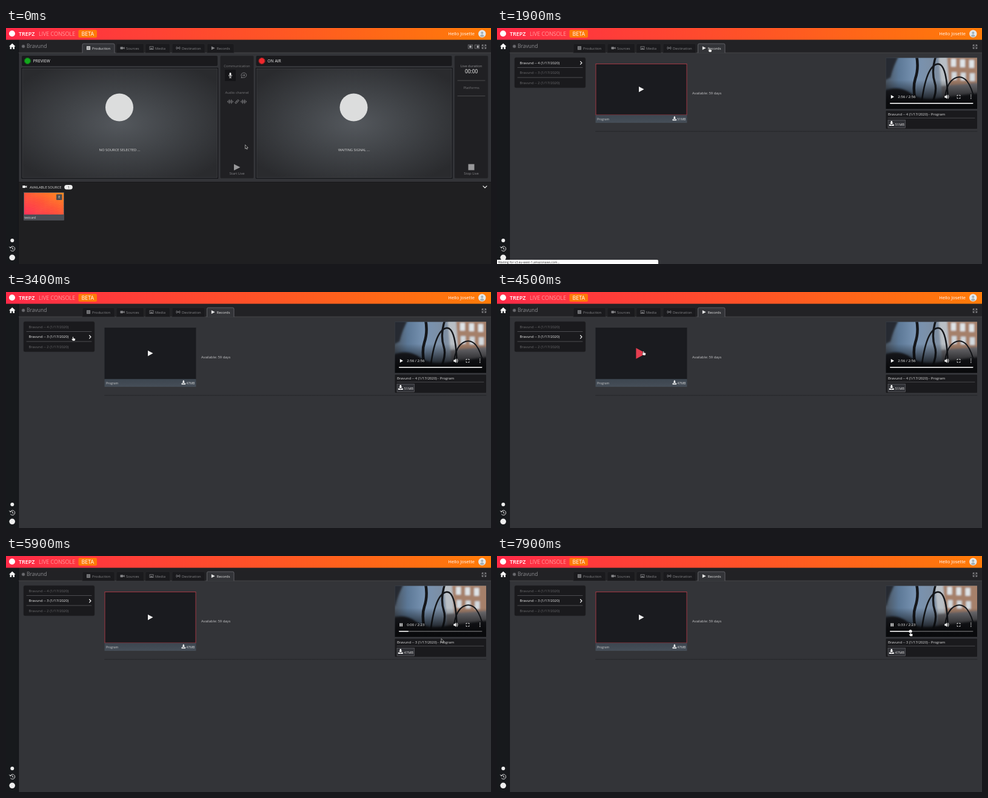
Write an HTML page that moves like this. It is 800 px wide and 391 px high and loops after 8 s.

```html
<!DOCTYPE html>
<html lang="en">
<head>
<meta charset="utf-8">
<title>Live console</title>
<style>
  html, body { margin: 0; width: 100%; height: 100%; overflow: hidden; background: #333438; }
  svg { display: block; width: 100%; height: 100%; }
  text { font-family: "Open Sans", "Noto Sans", sans-serif; white-space: pre; }
  .mid { text-anchor: middle; }
  .end { text-anchor: end; }
  .line { fill: none; stroke-linecap: round; stroke-linejoin: round; }
</style>
</head>
<body>
<svg id="stage" viewBox="0 0 800 391" preserveAspectRatio="none"></svg>
<script>
const LOOP = 8000, STEP = 100;
const OPEN = 1300, STATUS_END = 2300, PICK = 3100, LOAD = 4900, PLAY = 5300, SEEK = 6900;
const PROJECT = 'Bravund';

const rect = (x, y, w, h, fill, more = '') =>
  `<rect x="${x}" y="${y}" width="${w}" height="${h}" fill="${fill}" ${more}/>`;
const dot = (x, y, r, fill, more = '') => `<circle cx="${x}" cy="${y}" r="${r}" fill="${fill}" ${more}/>`;
const shape = (d, fill, more = '') => `<path d="${d}" fill="${fill}" ${more}/>`;
const line = (d, color, w = 0.7, more = '') =>
  `<path class="line" d="${d}" stroke="${color}" stroke-width="${w}" ${more}/>`;
const text = (x, y, s, size = 5.85, fill = '#ccc', more = '') =>
  `<text x="${x}" y="${y}" font-size="${size}" fill="${fill}" ${more}>${s}</text>`;
const group = (id, body, more = '') => `<g id="${id}" ${more}>${body}</g>`;
const at = (x, y, body) => `<g transform="translate(${x} ${y})">${body}</g>`;

const icon = {
  film: c => rect(-3, -3, 6, 6, c) + line('M-1.2 -2V2M1.2 -2V2M-1.2 0H1.2', '#333438', 0.5),
  camera: c => rect(-3.5, -2, 4.6, 4, c, 'rx=".6"') + shape('M1.3 -.5L3.5 -2V2L1.3 .5Z', c),
  image: c => rect(-3, -2.4, 6, 4.8, 'none', `stroke="${c}" stroke-width=".8"`) +
    shape('M-2.2 1.6L-.6 -.6 .5 .6 1.2 0 2.3 1.6Z', c),
  antenna: c => dot(0, 0, 0.9, c) +
    line('M-1.5 -1.5Q-2.3 0 -1.5 1.5M1.5 -1.5Q2.3 0 1.5 1.5M-2.7 -2.2Q-4 0 -2.7 2.2M2.7 -2.2Q4 0 2.7 2.2', c),
  play: c => shape('M-2.7 -3L3.2 0 -2.7 3Z', c),
  expand: c => line('M-3.2 -1V-3H-1.2M1.2 -3H3.2V-1M3.2 1V3H1.2M-1.2 3H-3.2V1M-3 -2.8L-1 -.9M3 -2.8L1 -.9M3 2.8L1 .9M-3 2.8L-1 .9', c, 0.8),
  download: c => shape('M-1 -3.4H1V-.9H2.4L0 1.5 -2.4 -.9H-1Z', c) + shape('M-3.3 1.4H-1.3L0 2.5 1.3 1.4H3.3V3.4H-3.3Z', c),
  wave: c => line('M-4.5 -.5V.5M-3 -2V2M-1.5 -3.2V3.2M0 -1.5V1.5M1.5 -3.2V3.2M3 -2V2M4.5 -.5V.5', c, 0.9)
};

function defs() {
  const stops = list => list.map(([o, c, a = 1]) => `<stop offset="${o}" stop-color="${c}" stop-opacity="${a}"/>`).join('');
  return `<defs>
    <linearGradient id="head">${stops([[0, '#ff2a48'], [0.5, '#ff5128'], [1, '#ff7c08']])}</linearGradient>
    <radialGradient id="glow" r=".62">${stops([[0, '#54585d'], [0.45, '#414448'], [1, '#2a2b2e']])}</radialGradient>
    <linearGradient id="card" x1="0" y1="1" x2="1" y2="0">${stops([[0, '#ff2b5a'], [0.5, '#ff5038'], [1, '#ff8a1c']])}</linearGradient>
    <linearGradient id="foot" x1="0" y1="0" x2="0" y2="1">${stops([[0, '#3d4650'], [1, '#464e58']])}</linearGradient>
    <linearGradient id="sky">${stops([[0, '#4b5561'], [0.14, '#5c7896'], [0.32, '#7893b2'], [0.55, '#7d8ea2'], [0.72, '#98a0a8'], [1, '#8f8983']])}</linearGradient>
    <linearGradient id="shade" x1="0" y1="0" x2="0" y2="1">${stops([[0, '#08090b', 0], [0.45, '#08090b', 0.55], [0.75, '#08090b', 0.9], [1, '#08090b', 0.96]])}</linearGradient>
    <filter id="soft" x="-10%" y="-10%" width="120%" height="120%"><feGaussianBlur stdDeviation="1.4"/></filter>
    <filter id="mild" x="-10%" y="-10%" width="120%" height="120%"><feGaussianBlur stdDeviation=".5"/></filter>
    <clipPath id="frame"><rect x="641.5" y="49.5" width="150.5" height="84.5"/></clipPath>
    <clipPath id="thumb"><rect x="30" y="273" width="65" height="36"/></clipPath>
  </defs>`;
}

function chrome() {
  return rect(0, 0, 800, 391, '#333438') +
    rect(21, 19, 779, 22, '#222225') + rect(0, 19, 21, 372, '#17191c') +
    rect(20.5, 19, 0.7, 372, '#101114') +
    rect(0, 0, 800, 19.5, 'url(#head)') +
    dot(10, 9.2, 5, '#fff') +
    text(21, 12.6, 'TREPZ', 9, '#fff', 'font-weight="600"') +
    text(54, 12.6, 'LIVE CONSOLE', 9.1, '#ffd9d2', 'font-weight="300"') +
    rect(119.5, 3, 30.5, 13, '#ff7a08', 'rx="2.5"') +
    text(134.8, 12.6, 'BETA', 8.9, '#fff', 'class="mid"') +
    text(773, 12, 'Hello Josette', 7.5, '#fff', 'class="end"') +
    dot(785.3, 9.5, 6.2, '#e4e8ea') + dot(785.3, 8, 2, '#a3b0b6') +
    shape('M781.6 13.2Q785.3 8 789 13.2 785.3 16.2 781.6 13.2Z', '#a3b0b6') +
    shape('M5 30.5L10.3 25.5 15.6 30.5H14V35H11.4V31.8H9.2V35H6.6V30.5Z', '#f4f4f4') +
    dot(10.3, 352, 3, '#eee') +
    line('M7 364.2A4 4 0 1 1 7.4 368M5.6 362.6L7 364.6 9 363.4M10.6 364V366.2H12.3', '#eee', 0.9) +
    dot(10.2, 380.3, 4.8, '#eee') +
    dot(28.6, 30.4, 2.4, '#6c6c70', 'stroke="#5c5c60" stroke-width="1.2" stroke-dasharray="1 .7"') +
    text(34, 33.4, PROJECT, 8.5, '#8d8d91') +
    at(788.5, 31, icon.expand('#a8a8ab'));
}

function tabs(active) {
  const list = [
    ['Production', 126, 53, 'film'], ['Sources', 182, 45.5, 'camera'], ['Media', 230, 40.5, 'image'],
    ['Destination', 274, 54, 'antenna'], ['Records', 331.5, 44.5, 'play']
  ];
  return line('M21 41H800', '#55565a', 0.6) + list.map(([name, x, w, pic]) => {
    const on = name === active, c = on ? '#e6e6e6' : '#858588';
    const d = `M${x} 41.3V28Q${x} 26 ${x + 2} 26H${x + w - 2}Q${x + w} 26 ${x + w} 28V41.3`;
    return shape(d, on ? '#333438' : '#1a1a1d', `stroke="${on ? '#77787c' : '#2a2a2d'}" stroke-width=".7"`) +
      at(x + 10, 33.2, icon[pic](c)) + text(x + 16, 35.7, name, 5.9, c);
  }).join('');
}

function screen(x, label, color, id, title) {
  const cx = x + 161.5;
  return rect(x, 46, 323, 17, '#1a1a1d', 'rx="2"') +
    group(id, dot(x + 9.5, 54.6, 4.6, color) +
      dot(x + 9.5, 54.6, 5.1, 'none', `stroke="${color}" stroke-width="1" stroke-dasharray="1 .6"`)) +
    text(x + 18.8, 57, title, 6.75, '#eee') +
    rect(x, 66.5, 323.5, 182.5, 'url(#glow)', 'stroke="#101114" stroke-width="1.2"') +
    rect(x + 1.1, 67.6, 321.3, 180.3, 'none', 'stroke="#4a4b4f" stroke-width=".5"') +
    dot(cx - 0.5, 131.5, 23, '#dcdddd') +
    text(cx, 203.5, label, 5.85, '#ddd', 'class="mid"');
}

function production() {
  const grey = '#77777a';
  const note = (x, y, s, c = grey) => text(x, y, s, 5.85, c, 'class="mid"');
  const side = x => rect(x, 46, 55, 203, '#202023', 'rx="2" stroke="#29292c" stroke-width=".6"');
  return tabs('Production') +
    at(766, 31, rect(-3.7, -3, 7.4, 6, 'none', 'stroke="#88888b" stroke-width=".7"') + rect(-1.8, -1.7, 3.6, 3.4, '#b0b0b3')) +
    at(777, 31, rect(-3.7, -3, 7.4, 6, 'none', 'stroke="#88888b" stroke-width=".7"') + rect(-0.4, -1.8, 3, 3.6, '#b0b0b3')) +
    screen(26, 'NO SOURCE SELECTED ...', '#12a81c', 'ready', 'PREVIEW') +
    screen(412.5, 'WAITING SIGNAL ...', '#f0282d', 'air', 'ON AIR') +
    side(353.5) + side(740) +
    note(381, 65, 'Communication') +
    rect(361, 69, 18, 19, '#151518', 'rx="1"') +
    rect(368.6, 74, 2.8, 5.4, '#f0f0f0', 'rx="1.4"') +
    line('M367.3 78.2Q367.5 80.8 370 80.8 372.5 80.8 372.7 78.2M370 81V82.6M368.4 82.6H371.6', '#f0f0f0', 0.7) +
    line('M388.2 82.2L389 80.8A4.4 4 0 1 1 391.5 82.1ZM390 78.2H393.8M392.5 76.8L394 78.2 392.5 79.6', '#8a8a8d', 0.8) +
    note(381, 108.5, 'Audio channel') +
    at(370, 122, icon.wave(grey)) + at(392, 122, icon.wave(grey)) +
    at(381, 122, `<g transform="rotate(-45)">` +
      line('M-.4 -1.3H-2.4A1.3 1.3 0 0 0 -2.4 1.3H-.6M.4 -1.3H2.4A1.3 1.3 0 0 1 2.4 1.3H.6M-1.3 0H1.3', '#8a8a8d', 0.9) + '</g>') +
    shape('M376 225.5L386.4 230.8 376 236Z', '#98989a') + note(381, 243, 'Start Live', '#858588') +
    note(767.6, 65, 'Live duration', '#929295') +
    text(767.6, 75, '00:00', 8.3, '#fff', 'class="mid"') +
    line('M745 87H790M745 112.6H790', '#68686b', 0.6) +
    note(767.6, 100.7, 'Platforms') +
    rect(762.5, 225.5, 10, 10, '#98989a') + note(767.6, 243, 'Stop Live', '#858588') +
    rect(21, 255, 779, 136, '#1f1f21') + line('M21 255.3H800', '#161619', 0.8) +
    at(30.8, 263, icon.camera('#eee')) + text(39, 266, 'AVAILABLE SOURCE', 5.8, '#ddd') +
    rect(96.2, 260, 13.6, 7.6, '#ededed', 'rx="3.8"') + text(103, 266, '1', 5.6, '#222', 'class="mid"') +
    line('M787 261.8L790 264.8 793 261.8', '#fff', 1.2) +
    rect(29.3, 272.4, 66.4, 46, '#4a4e56', 'stroke="#5a5d63" stroke-width=".5"') +
    rect(30, 273, 65, 36, 'url(#card)') +
    '<path id="dots" fill="none" stroke="#ffb04a" stroke-width=".8" stroke-linecap="round" opacity=".55" clip-path="url(#thumb)"/>' +
    rect(83, 275.5, 9.5, 9.5, '#4d4d50', 'rx="1"') + text(87.8, 282.4, 'E', 5.6, '#e8e8e8', 'class="mid"') +
    text(30.3, 315.7, 'testcard', 5, '#ddd');
}

function photo() {
  const cable = (d, w) => line(d, '#15171b', w);
  const windows = [749, 764, 779].map((x, i) =>
    rect(x, 51 + i, 8, 13, '#dfe4e8') + rect(x + 1, 73 + i, 8, 13, '#d3d9de')).join('');
  return '<g clip-path="url(#frame)">' + rect(641, 49, 152, 86, 'url(#sky)') +
    group('scene',
      shape('M742 44H806V92L746 96Z', '#a5806a') + windows +
      shape('M728 44H742L746 97H733Z', '#b9bfc5') +
      shape('M733 96L806 90V140H736Z', '#77767a') +
      shape('M630 44H664Q654 62 649 82L630 92Z', '#272b32') +
      shape('M630 108Q660 92 682 108T740 114L806 106V140H630Z', '#1c1e22'), 'filter="url(#soft)"') +
    '<g filter="url(#mild)">' +
    cable('M692 46Q696 66 690 84T694 136', 4.5) +
    cable('M699 136Q706 66 725 60T744 136', 2.6) +
    cable('M724 46Q716 72 722 90T712 136', 3.4) +
    cable('M737 136Q738 88 758 82T788 120', 2) + '</g>' +
    rect(641, 86, 152, 49, 'url(#shade)') + '</g>';
}

function player() {
  return photo() +
    group('paused', shape('M649.8 111L655 114 649.8 117Z', '#fff')) +
    group('playing', rect(649.5, 111.3, 1.6, 5.4, '#fff') + rect(652.3, 111.3, 1.6, 5.4, '#fff')) +
    '<text id="clock" x="661.3" y="116.1" font-size="6" fill="#fff"></text>' +
    shape('M738.3 112.6H740L742.4 110.6V117.4L740 115.4H738.3Z', '#fff') +
    line('M743.5 112.4Q744.6 114 743.5 115.6M744.3 110.9Q746.5 114 744.3 117.1', '#fff', 0.7) +
    line('M759 112.7V111.4H760.4M762.6 111.4H764V112.7M764 115.3V116.6H762.6M760.4 116.6H759V115.3', '#fff', 0.8) +
    [111.3, 114, 116.7].map(y => dot(781.8, y, 0.75, '#fff')).join('') +
    rect(648, 124, 137.5, 1.6, '#fff', 'opacity=".35" rx=".8"') +
    '<rect id="bar" x="648" y="124" height="1.6" rx=".8" fill="#fff"/>' +
    dot(682, 124.8, 2.6, '#fff', 'id="knob"');
}

function records() {
  return tabs('Records') +
    rect(29, 49, 117, 50, '#1a1a1d', 'rx="2.5" stroke="#222225" stroke-width=".5"') +
    line('M34 65.5H141M34 82H141', '#707073', 0.6) +
    [4, 3, 2].map((n, i) => text(37.5, 59.8 + i * 16.6, `${PROJECT} -- ${n} (1/17/2020)`, 5.85, '#6b6b6e', `id="row${n}"`)).join('') +
    group('mark', line('M137.6 55.4L140 57.8 137.6 60.2', '#fff', 1.2)) +
    rect(163, 59.5, 150, 84.5, '#1a1b1f', 'id="cardbox" stroke-width=".9"') +
    rect(162.6, 144.3, 150.8, 12.8, 'url(#foot)') +
    text(165, 152.7, 'Program', 5, '#ccc') +
    at(292.8, 149.8, icon.download('#fff')) + text(297.3, 152.9, '', 5.2, '#ddd', 'id="size"') +
    shape('M234 97L242.5 101.6 234 106.2Z', '#f0f0f0', 'id="start"') +
    shape('M229.4 92.8L245.8 101.8 229.4 110.8Z', '#e63e50', 'id="hot"') +
    text(322, 110.3, 'Available: 59 days', 5.85, '#c8c8ca') +
    line('M163 171.2H792', '#1f2023', 0.8, 'stroke-dasharray="1.2 1.2"') +
    player() +
    rect(641.5, 137, 150.5, 30, '#1a1a1d', 'rx="1"') +
    text(645, 145.2, '', 5.85, '#e2e2e2', 'id="title"') +
    line('M645 149.2H788', '#6a6a6d', 0.6) +
    rect(645, 152.4, 28.5, 13, '#303136', 'stroke="#6c6d71" stroke-width=".6"') +
    at(650.8, 158, `<g transform="scale(1.2)">${icon.download('#fff')}</g>`) +
    text(656.5, 162, '', 5.8, '#ddd', 'id="size2"') +
    group('status', shape('M0 384H264Q266 384 266 386V391H0Z', '#fdfdfd') +
      text(2, 389.8, 'Waiting for s3.eu-west-1.amazonaws.com...', 5.05, '#333'));
}

const pointer =
  shape('M0 0V6.6L1.6 5.2 2.6 7.5 3.7 7 2.7 4.9H4.8Z', '#111', 'id="arrow" stroke="#e8e8e8" stroke-width=".6"') +
  shape('M-.8 .6Q0 -.5 .8 .6V2.6L3 3.1Q4 3.4 3.8 4.4L3.2 7H-.4L-2.4 4.2Q-2.4 3.3 -1.4 3.5L-.8 4Z', '#fff',
    'id="hand" stroke="#111" stroke-width=".5"');

const stage = document.getElementById('stage');
stage.innerHTML = defs() + chrome() + group('live', production()) + group('archive', records()) + group('cursor', pointer);

const el = {};
stage.querySelectorAll('[id]').forEach(n => { el[n.id] = n; });
const show = (id, on) => { el[id].style.display = on ? '' : 'none'; };
const set = (id, attrs) => { for (const k in attrs) el[id].setAttribute(k, attrs[k]); };
const within = (t, spans) => spans.some(([a, b]) => t >= a && t < b);

// time, x, y of the pointer tip
const path = [
  [0, 394.5, 193.5], [200, 394, 191], [900, 355, 36.5], [1200, 350.5, 33], [2000, 350.5, 33],
  [2800, 116, 76], [3100, 110.5, 74], [3600, 110.5, 74], [4300, 241.5, 98], [5000, 242, 98],
  [5700, 712, 134], [5900, 718, 136.8], [6200, 716, 136], [6700, 679, 125.5], [7100, 681.5, 126], [8000, 682, 126]
];
const hands = [[1000, 2100], [2700, 3700], [4100, 5100], [6600, LOOP]];

function place(t) {
  const i = path.findIndex(p => p[0] > t);
  const [t0, x0, y0] = path[i - 1], [t1, x1, y1] = path[i];
  const u = (t - t0) / (t1 - t0), e = u * u * (3 - 2 * u);
  return [x0 + (x1 - x0) * e, y0 + (y1 - y0) * e];
}

function ripple(t) {
  let d = '';
  for (let r = 0; r < 18; r++)
    for (let c = 0; c < 30; c++) {
      const x = 30 + c * 2.3 + (r % 2), y = 273 + r * 2.2;
      const lift = 1.6 * Math.sin(c * 0.35 + r * 0.4 - t / 260);
      d += `M${x.toFixed(1)} ${(y + lift).toFixed(1)}h.01`;
    }
  return d;
}

function draw(t) {
  const open = t >= OPEN, picked = t >= PICK, loaded = t >= LOAD, sought = t >= SEEK;
  show('live', !open);
  show('archive', open);
  if (!open) {
    const beat = 0.8 + 0.2 * Math.cos(t / 1800 * 2 * Math.PI);
    set('air', { opacity: beat });
    set('ready', { opacity: 0.5 + beat / 2 });
    set('dots', { d: ripple(t) });
  }
  show('status', t < STATUS_END);

  set('row4', { fill: picked ? '#6b6b6e' : '#f0f0f0' });
  set('row3', { fill: picked ? '#f0f0f0' : '#6b6b6e' });
  set('mark', { transform: `translate(0 ${picked ? 16.6 : 0})` });
  set('cardbox', { stroke: picked && !loaded ? '#1a1b1f' : '#b03a46' });
  el.size.textContent = picked ? '47MB' : '51MB';
  const hot = within(t, [[4200, 5100]]);
  show('hot', hot);
  show('start', !hot);

  el.title.textContent = `${PROJECT} -- ${loaded ? 3 : 4} (1/17/2020) - Program`;
  el.size2.textContent = loaded ? '47MB' : '51MB';
  show('paused', !loaded);
  show('playing', loaded);
  const sec = sought ? 32 + Math.floor((t - SEEK) / 1000) : Math.max(0, Math.floor((t - PLAY) / 1000));
  el.clock.textContent = loaded ? `0:${String(sec).padStart(2, '0')} / 2:23` : '2:56 / 2:56';
  const head = 681 + (t - SEEK) / 1000;
  set('bar', { width: !loaded ? 137.5 : sought ? head - 648 : 16 });
  set('knob', { cx: head });
  show('knob', sought);
  set('scene', { transform: `translate(${loaded ? -7 + Math.sin(t / 900) : 0} 0)` });

  const hand = within(t, hands), [x, y] = place(t);
  show('hand', hand);
  show('arrow', !hand);
  set('cursor', { transform: `translate(${x.toFixed(2)} ${y.toFixed(2)})` });
}

const begin = performance.now();
function tick() {
  const t = (performance.now() - begin) % LOOP;
  draw(Math.floor(t / STEP) * STEP);
  requestAnimationFrame(tick);
}
tick();
</script>
</body>
</html>
```
